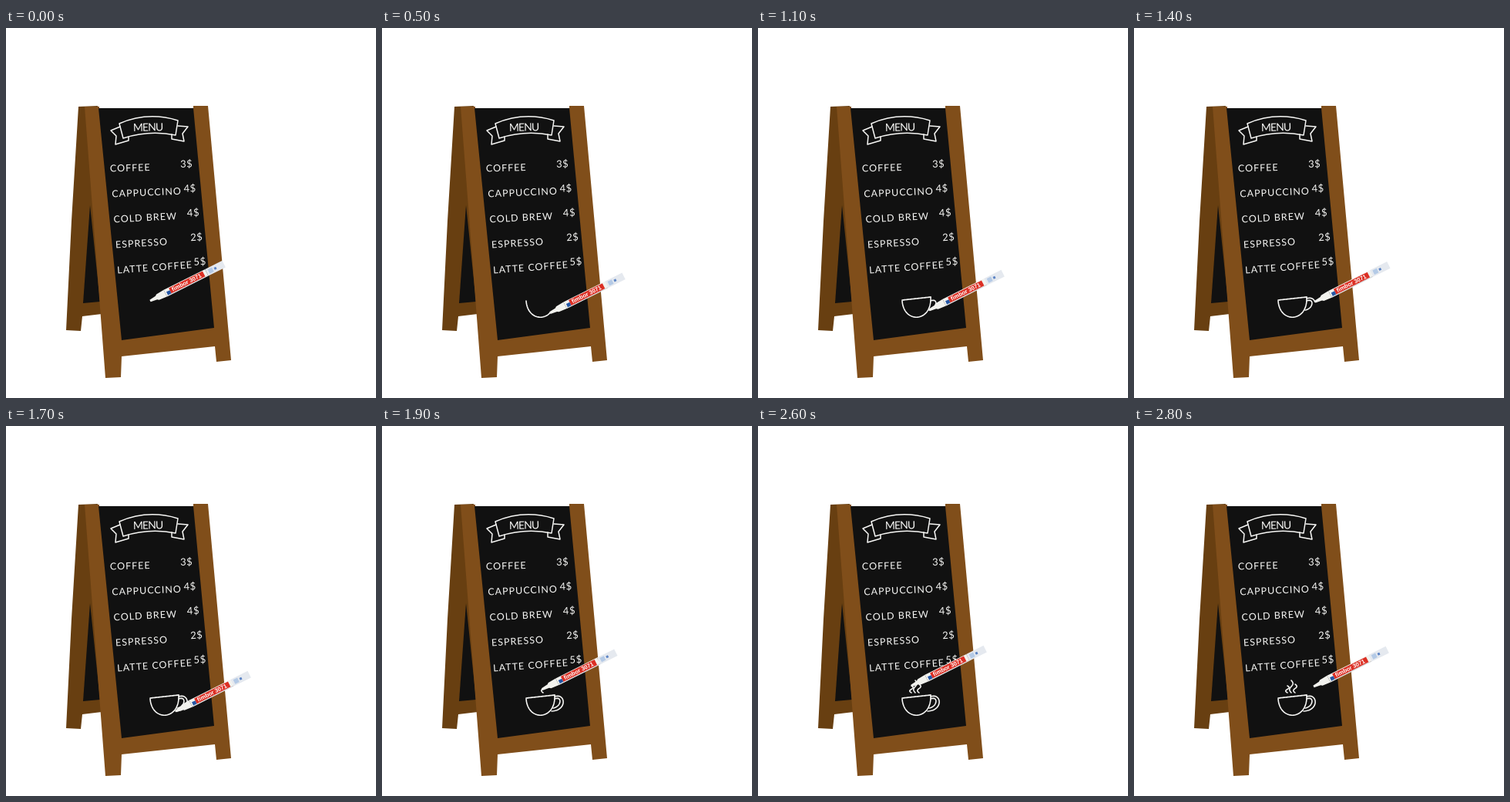
An HTML page with a canvas that plays this animation: 480 by 480 pixels, repeating every 2900 ms.

```html
<!DOCTYPE html>
<html lang="en">
<head>
<meta charset="utf-8">
<title>Menu board</title>
<style>
  html, body { margin: 0; width: 100%; height: 100%; overflow: hidden; background: #fff; }
  canvas { display: block; width: 480px; height: 480px; }
</style>
</head>
<body>
<canvas id="stage" width="480" height="480"></canvas>
<script>
const ctx = document.getElementById('stage').getContext('2d');
const STEP = 100, STEPS = 29;
const WOOD = '#804e1a', SHADE = '#683f11', BOARD = '#111', CHALK = '#f7f7f5';
const MENU = { 'COFFEE': '3$', 'CAPPUCCINO': '4$', 'COLD BREW': '4$', 'ESPRESSO': '2$', 'LATTE COFFEE': '5$' };

const mix = (a, b, p) => a.map((v, i) => v + (b[i] - v) * p);
const line = (a, b) => p => mix(a, b, p);
const curve = (a, b, c, d) => p => {
  const ab = mix(a, b, p), bc = mix(b, c, p), cd = mix(c, d, p);
  return mix(mix(ab, bc, p), mix(bc, cd, p), p);
};
const steam = (x, height) => p => [x - 2.2 * Math.sin(p * 2 * Math.PI), 346 - height * p];

// Pen strokes in drawing order; start and span count in steps.
const strokes = [
  { start: 0, span: 7, at: curve([187, 354], [189, 384], [226, 382], [224, 349]) },
  { start: 7, span: 1, at: line([224, 349], [187, 353]) },
  { start: 8.5, span: 2.5, at: curve([224, 354], [234, 350], [233, 364], [222, 366]) },
  { start: 12, span: 5, at: curve([224, 351], [238, 346], [241, 369], [220, 370]) },
  { start: 18, span: 2.5, at: steam(209, 11) },
  { start: 20.5, span: 2.5, at: steam(204, 16) },
  { start: 23.5, span: 2.5, at: steam(199, 9) },
  { start: 26, span: 2, at: line([199, 337], [233, 338]), lifted: true },
];

function poly(color, ...pts) {
  ctx.beginPath();
  pts.forEach(p => ctx.lineTo(...p));
  ctx.closePath();
  ctx.fillStyle = color;
  ctx.fill();
}

function chalk(path, width) {
  ctx.strokeStyle = CHALK;
  ctx.lineWidth = width;
  ctx.stroke(path);
}

function letter(text, x, y, angle, size, spacing, align = 'left') {
  ctx.save();
  ctx.translate(x, y);
  ctx.rotate(angle);
  ctx.font = `${size}px Lato, sans-serif`;
  ctx.letterSpacing = `${spacing}px`;
  ctx.textAlign = align;
  ctx.fillStyle = CHALK;
  ctx.fillText(text, 0, 0);
  ctx.restore();
}

function drawStand() {
  poly(SHADE, [94, 102], [119, 101], [124, 371], [99, 374], [97, 393], [78, 392], [85, 250]);
  poly(BOARD, [109, 230], [122, 355], [100, 357]);
  poly(WOOD, [102, 102], [121, 102], [121, 105], [243, 105], [243, 101], [262, 101],
    [292, 431], [273, 433], [271, 413], [150, 426], [149, 453], [129, 454]);
  poly(BOARD, [120, 104], [243, 104], [270, 389], [150, 405]);
}

function drawBanner() {
  chalk(new Path2D('M147 124Q184 108 223 120L220 139Q186 132 152 143Z'), 1.5);
  chalk(new Path2D('M148 128L136 133L143 140L142 151L159 146V141M223 127L236 128L229 137L231 147L215 144V138'), 1.5);
  letter('MENU', 165, 134, -.02, 14, -.9);
}

function drawMenu() {
  Object.entries(MENU).forEach(([item, price], i) => {
    const tilt = -.03 - .011 * i;
    letter(item, 135 + 2.4 * i, 186.5 + 33 * i, tilt, 12.5, 1);
    letter(price, 242.5 + 4.4 * i, 180.5 + 31.6 * i, tilt, 13, .6, 'right');
  });
}

const progress = (stroke, step) => Math.min(1, (step - stroke.start) / stroke.span);

function drawStroke(stroke, step) {
  const end = progress(stroke, step);
  if (end <= 0 || stroke.lifted) return;
  const path = new Path2D();
  for (let i = 0; i <= 24; i++) path.lineTo(...stroke.at(end * i / 24));
  chalk(path, 1.6);
}

function penAt(step) {
  const stroke = strokes.findLast(s => s.start <= step);
  return stroke.at(progress(stroke, step));
}

function drawMarker([x, y]) {
  const bar = (color, left, top, right, bottom) => {
    ctx.fillStyle = color;
    ctx.fillRect(left, top, right - left, bottom - top);
  };
  ctx.save();
  ctx.translate(x, y);
  ctx.rotate(-.464);
  poly('#f2f2ee', [0, -1.5], [9, -2.5], [11, -4], [22, -4.8], [22, 4.8], [11, 4], [9, 2.5], [0, 1.5]);
  bar('#f2f2ee', 22, -4.8, 82, 4.8);
  bar('#d3d5d8', 22, 3.6, 82, 4.8);
  bar('#e5e9ef', 82, -4.8, 107, 4.8);
  bar('#dc2f24', 29, -4, 78, 3.6);
  bar('#2456a5', 24, -1, 29, 3.6);
  bar('#b4cae6', 85, -3, 91, 3);
  bar('#5b83c4', 93, -1.5, 96, 1.5);
  ctx.fillStyle = '#fff';
  ctx.font = 'bold 7.5px "Liberation Sans", Arial, sans-serif';
  ctx.fillText('fimbor 3071', 32, 2.2);
  ctx.restore();
}

function draw(now) {
  const step = Math.floor(now / STEP) % STEPS;
  ctx.fillStyle = '#fff';
  ctx.fillRect(0, 0, 480, 480);
  ctx.lineCap = ctx.lineJoin = 'round';
  drawStand();
  drawBanner();
  drawMenu();
  strokes.forEach(s => drawStroke(s, step));
  drawMarker(penAt(step));
}

let origin;
function tick(now) {
  origin ??= now;
  draw(now - origin);
  requestAnimationFrame(tick);
}
draw(0);
requestAnimationFrame(tick);
</script>
</body>
</html>
```
